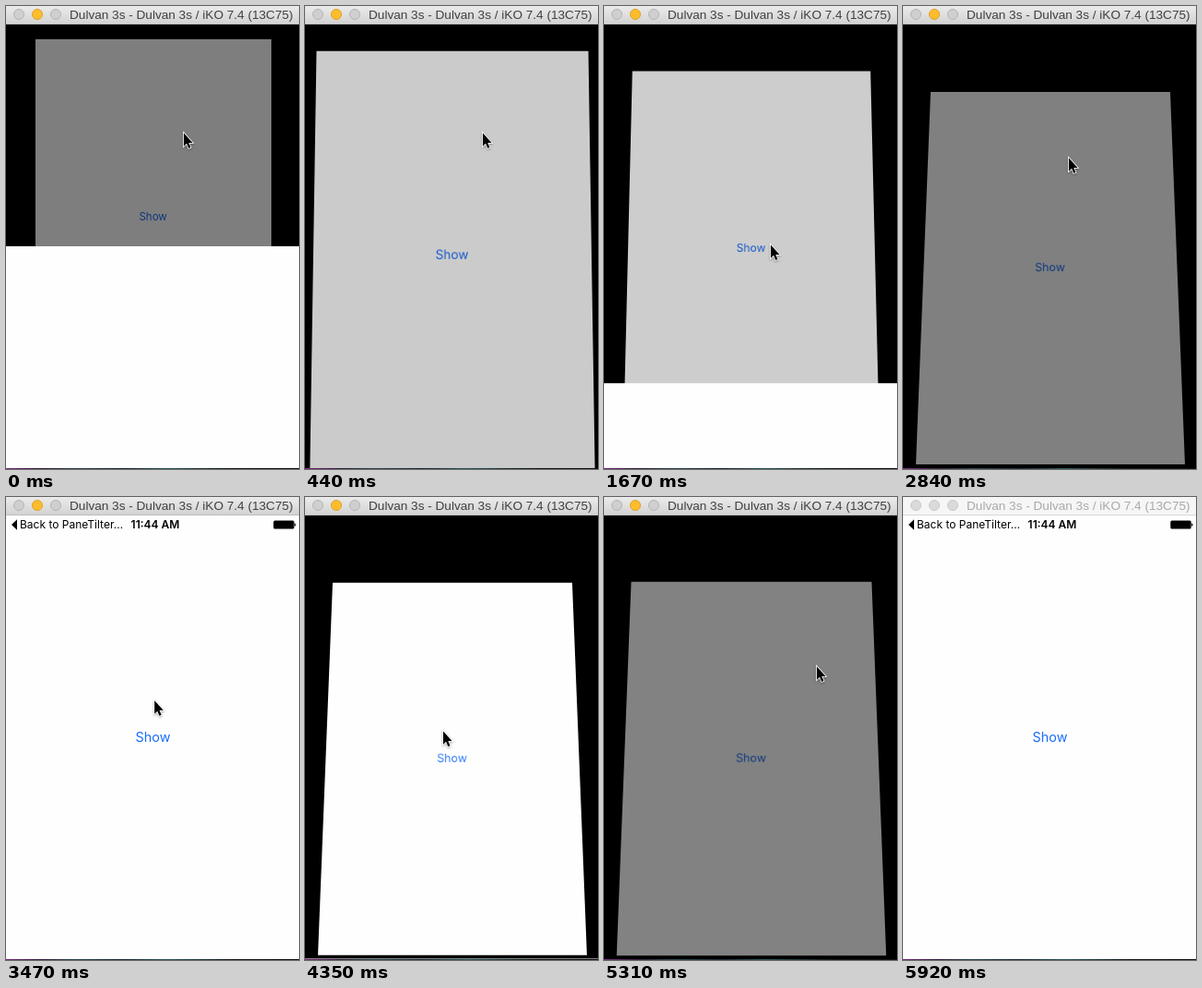
Recreate the animation shown at these times as an HTML page. Size 318 by 501 pixels, loop 6010 ms.

```html
<!DOCTYPE html>
<html lang="en">
<head>
<meta charset="utf-8">
<title>Push-back sheet</title>
<style>
  html, body { margin: 0; width: 100%; height: 100%; overflow: hidden; background: #000; }
  #stage { position: relative; width: 318px; height: 501px; overflow: hidden; background: #000; }
  #stage div, #stage svg { position: absolute; }

  #bar {
    left: 0; top: 0; width: 318px; height: 20px; box-sizing: border-box;
    background: linear-gradient(#ebebeb, #d3d3d3); border-bottom: 1px solid #bdbdbd;
    font: 13.6px/19px "Liberation Sans", Arial, sans-serif; color: #404040; white-space: nowrap;
  }
  #bar div { left: 69px; top: 0; }
  #bar i {
    position: absolute; top: 3px; width: 12px; height: 12px; box-sizing: border-box;
    border-radius: 50%; background: #cfcfcf; border: 1px solid #b5b5b5;
  }
  #bar .min { background: #fdbd2d; border-color: #e0a126; }
  #bar.idle { background: #f6f6f6; border-color: #d8d8d8; color: #a9a9a9; }
  #bar.idle i { background: #dadada; border-color: #cbcbcb; }

  #screen { left: 0; top: 20px; width: 318px; height: 480px; overflow: hidden; }
  #view { left: 0; top: 0; width: 320px; height: 480px; background: #fefefe; }
  #show {
    left: 0; width: 319px; top: 230px; text-align: center;
    font: 14.4px/20px Inter, Roboto, sans-serif; color: #1a6dfa;
  }
  #dim { inset: 0; background: #000; }
  #sheet { left: 0; bottom: 0; width: 318px; height: 240px; background: #fefefe; }

  #status {
    left: 0; top: 20px; width: 318px; height: 20px;
    font: 12px/20px Inter, Roboto, sans-serif; color: #000; white-space: nowrap;
  }
  #status > * { top: 0; }
  #back { left: 15px; }
  #clock { left: 112px; width: 100px; text-align: center; font-weight: 600; }

  #edge {
    left: 0; top: 500px; width: 318px; height: 1px;
    background: linear-gradient(90deg, #7a2c80, #33203c 12%, #2c4a4c 24%, #1d2a30 40%, #2f5a58 55%, #15181c 78%, #111);
  }
  #cursor { left: 0; top: 0; overflow: visible; filter: drop-shadow(0 1px 1px rgba(0, 0, 0, .35)); }
</style>
</head>
<body>
<div id="stage">
  <div id="screen">
    <div id="view">
      <div id="show">Show</div>
      <div id="dim"></div>
    </div>
    <div id="sheet"></div>
  </div>
  <div id="status">
    <svg width="318" height="20">
      <path d="M6 10 12 4.3V15.7Z"/>
      <rect x="290.3" y="5.5" width="22.4" height="9" rx="1.6"/>
      <path d="M313.2 8.2q1.4.4 1.4 1.8t-1.4 1.8Z"/>
    </svg>
    <div id="back">Back to PaneTilter…</div>
    <div id="clock">11:44 AM</div>
  </div>
  <div id="bar">
    <i style="left:8px"></i><i class="min" style="left:28px"></i><i style="left:48px"></i>
    <div>Dulvan 3s - Dulvan 3s / iKO 7.4 (13C75)</div>
  </div>
  <div id="edge"></div>
  <svg id="cursor" width="12" height="19">
    <path d="M0 .4V14.8L3.1 11.8 5.3 16.9 7.5 16 5.3 11H9.6Z"
          stroke="#fff" stroke-width="1.6" paint-order="stroke"/>
  </svg>
</div>
<script>
const $ = id => document.getElementById(id);
const LOOP = 6010, STEPS = 68, STEP = LOOP / STEPS, LEAD = 17;
const IDLE_AT = 5920, GLIDE = 300, PRESS = 170;

const clamp = v => Math.min(1, Math.max(0, v));
const ease = v => v * v * (3 - 2 * v);
const easeOut = v => 1 - (1 - v) ** 2;
const mix = (a, b, p) => a + (b - a) * p;

// The view tilts away first, then flattens and rises with the sheet; closing runs back
const flat = { y: 0, scale: 1, angle: 0, dim: 0, sheet: 0 };
const tilt = { y: 22.8, scale: .8596, angle: 14.75, dim: 0, sheet: 0 };
const dark = { ...tilt, dim: .5 };
const up = { y: -32, scale: .8, angle: 0, dim: .5, sheet: 240 };

const move = (start, span, from, to) => ({ start, span, from, to });
const open = t => [move(t, 258, flat, tilt), move(t + 258, 250, tilt, up)];
const close = t => [move(t, 190, up, dark), move(t + 190, 180, dark, flat)];

const opens = [1316, 4066];
const closes = [150, 2637, 5099];
const moves = [...opens.flatMap(open), ...closes.flatMap(close)].sort((a, b) => a.start - b.start);

// Cursor stops: departure time, then where it glides to
const stops = [
  [-GLIDE, 193, 137], [484, 181, 258], [2130, 180, 164],
  [3330, 150, 253], [4570, 231, 183], [5330, 220, 520]
];

function poseAt(t) {
  const m = moves.findLast(m => t >= m.start);
  if (!m) return up;
  const p = ease(clamp((t - m.start) / m.span));
  return Object.fromEntries(Object.keys(up).map(k => [k, mix(m.from[k], m.to[k], p)]));
}

function cursorAt(t) {
  const i = stops.findLastIndex(s => t >= s[0]);
  const [start, x, y] = stops[i];
  const [, fromX, fromY] = stops[Math.max(0, i - 1)];
  const p = easeOut(clamp((t - start) / GLIDE));
  return [mix(fromX, x, p), mix(fromY, y, p)];
}

function labelAlpha(t) {
  const release = opens.findLast(v => t >= v - PRESS);
  return release ? mix(.25, 1, clamp((t - release) / 300)) : 1;
}

function draw(t) {
  const { y, scale, angle, dim, sheet } = poseAt(t);
  $("view").style.transform =
    `perspective(1053px) translateY(${y}px) scale(${scale}) rotateX(${angle}deg)`;
  $("dim").style.opacity = dim;
  $("sheet").style.transform = `translateY(${240 - sheet}px)`;
  $("show").style.opacity = labelAlpha(t);

  const [cx, cy] = cursorAt(t);
  $("cursor").style.transform = `translate(${cx}px, ${cy}px)`;
  $("bar").classList.toggle("idle", t >= IDLE_AT);
}

// The picture refreshes in even steps
const began = performance.now();
function frame() {
  const t = (performance.now() - began) % LOOP;
  draw(Math.floor((t + LEAD) / STEP) % STEPS * STEP);
  requestAnimationFrame(frame);
}
frame();
</script>
</body>
</html>
```
